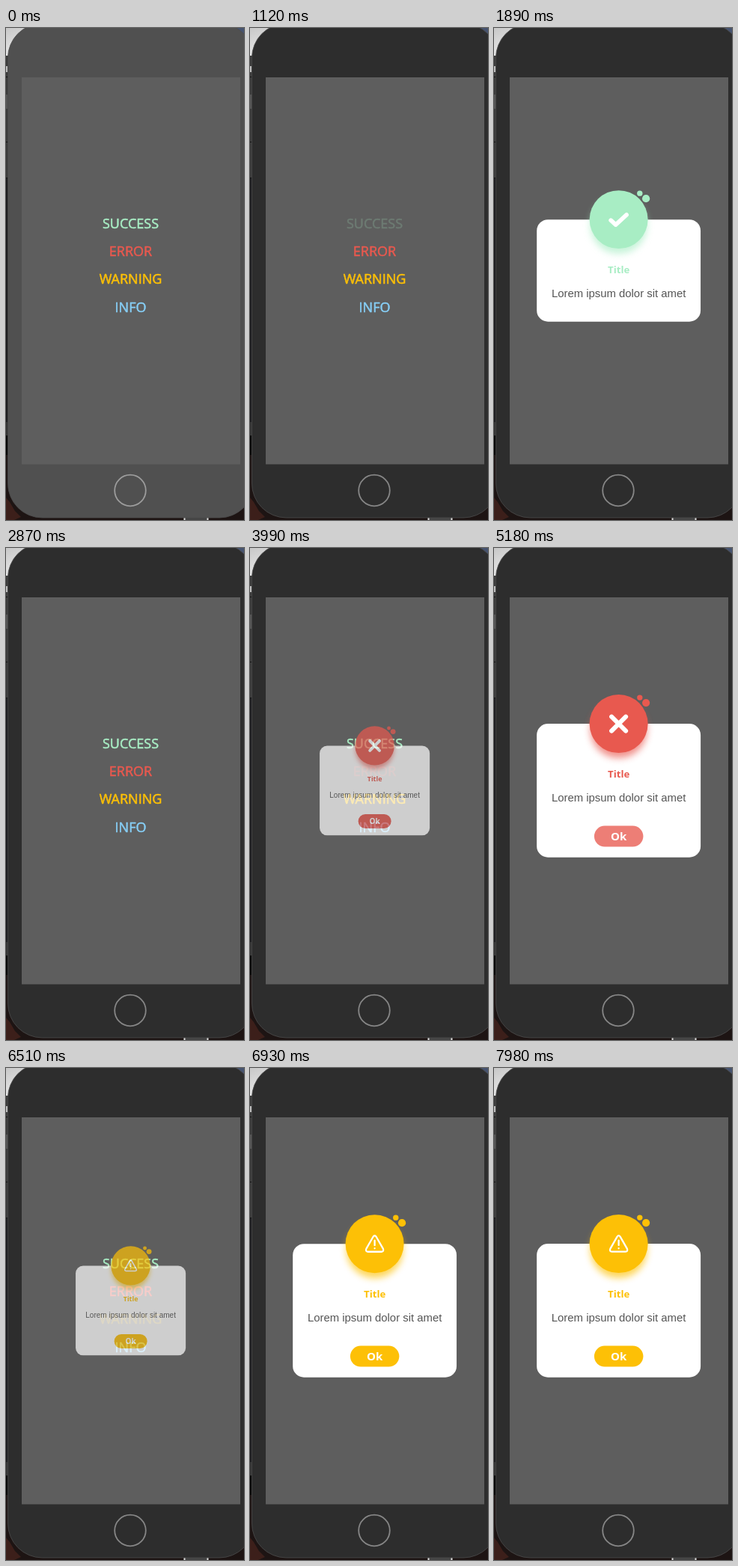
Animation of 318 by 658 pixels, one loop 8 s. Source, as an HTML page:

```html
<!DOCTYPE html>
<html lang="en">
<head>
<meta charset="utf-8">
<title>Popup demo</title>
<style>
  html, body { margin: 0; width: 100%; height: 100%; overflow: hidden; background: #222; }
  svg { display: block; width: 318px; height: 658px; }
  text { text-anchor: middle; }
  .menu { font: 400 18px "Open Sans", sans-serif; stroke-width: .55; stroke-linejoin: round; }
  .title { font: 700 13.2px "Open Sans", sans-serif; }
  .body { font: 400 14.9px "Liberation Sans", Arial, sans-serif; fill: #555; }
  .ok { font: 700 15px "Open Sans", sans-serif; fill: #fff; }
  .icon { fill: none; stroke: #fff; stroke-linecap: round; stroke-linejoin: round; }
</style>
</head>
<body>
<svg viewBox="0 0 318 658">
  <defs>
    <linearGradient id="light" x1="0" y1="0" x2=".6" y2="1">
      <stop offset="0" stop-color="#c8c8c8"/>
      <stop offset="1" stop-color="#f0f0f0"/>
    </linearGradient>
    <filter id="blur" x="-40%" y="-40%" width="180%" height="180%">
      <feGaussianBlur stdDeviation="5"/>
    </filter>
  </defs>

  <!-- desktop behind the phone -->
  <rect width="318" height="658" fill="#1c1c1f"/>
  <rect width="60" height="37" fill="url(#light)"/>
  <rect y="37" width="4" height="163" fill="#3a3a3a"/>
  <rect y="51" width="2" height="8" fill="#bbb"/>
  <rect y="89" width="4" height="19" fill="#555"/>
  <path d="M0 65.5H4M0 152.5H4M0 200.5H4" stroke="#111"/>
  <rect y="527" width="6" height="18" fill="#333"/>
  <rect y="545" width="8" height="26" fill="#050505"/>
  <rect y="571" width="318" height="87" fill="#1d1413"/>
  <path d="M0 628l5 6 7 12 8 8-9 4H0z" fill="#3c1f1a"/>
  <rect x="290" width="28" height="20" fill="#46536f"/>
  <rect x="238" y="650" width="32" height="8" fill="#444"/>
  <path d="M238.5 650V658M269.5 650V658" stroke="#ddd" stroke-width="2"/>

  <rect id="phone" x="2.5" y="-6" width="328.5" height="661" rx="46" stroke="#4c4c4c" stroke-width=".8"/>
  <rect x="21" y="66" width="292" height="517.5" fill="#5e5e5e"/>
  <circle id="home" cx="166" cy="618.5" r="20.8" fill="none" stroke-width="1.8"/>
  <g id="menu"></g>
  <g id="popups"></g>
</svg>
<script>
const LOOP = 8000;
const $ = id => document.getElementById(id);
const clamp = v => Math.max(0, Math.min(1, v));
const ease = p => p < .5 ? 2 * p * p : 1 - 2 * (1 - p) * (1 - p);

const icons = {
  check: '<path class="icon" stroke-width="5.6" d="M-10.5 1L-4 7L10.5 -6.3"/>',
  cross: '<path class="icon" stroke-width="6" d="M-9.5 -9.5L9.5 9.5M9.5 -9.5L-9.5 9.5"/>',
  alert: '<path class="icon" stroke-width="2.3" d="M-2.2 -9.2Q0 -12.6 2.2 -9.2L11.2 6.5Q12.8 10.2 9 10.6H-9Q-12.8 10.2 -11.2 6.5Z' +
         'M0 -4.5V2M0 6V6.2"/>'
};

// times in ms: press/release of the menu entry, open/close of its popup, tap on Ok
const items = [
  { label: 'SUCCESS', color: '#a8edc4', y: 267.5, icon: 'check', h: 136.6,
    press: 540, release: 1330, open: 1350, close: 2090 },
  { label: 'ERROR', color: '#e8594f', y: 305, icon: 'cross', h: 178.6, button: true,
    press: 3300, release: 3920, open: 3867, close: 5450, tap: 5125 },
  { label: 'WARNING', color: '#fdc006', y: 342.2, icon: 'alert', h: 178.6, button: true,
    press: 5870, release: 6440, open: 6387, close: Infinity, tap: Infinity },
  { label: 'INFO', color: '#86cdf4', y: 379.5 }
];

function popup({ color, h, icon, button }) {
  const ok = `<rect class="pill" x="-32.7" y="136.5" width="65.5" height="28" rx="14" fill="${color}"/>
    <text class="ok" y="156">Ok</text>`;
  return `<g class="popup"><g transform="translate(0 ${-h / 2})">
    <rect x="-109.5" width="219" height="${h}" rx="15" fill="#fff"/>
    <circle cy="8" r="38" fill="${color}" opacity=".65" filter="url(#blur)"/>
    <circle r="39" fill="${color}"/>
    <circle cx="28.2" cy="-35" r="3.7" fill="${color}"/>
    <circle cx="36.5" cy="-28" r="5.1" fill="${color}"/>
    ${icons[icon]}
    <text class="title" y="71.5" fill="${color}">Title</text>
    <text class="body" y="103.5">Lorem ipsum dolor sit amet</text>
    ${button ? ok : ''}
  </g></g>`;
}

$('menu').innerHTML = items.map(i =>
  `<text class="menu" x="166.5" y="${i.y}" fill="${i.color}" stroke="${i.color}">${i.label}</text>`).join('');
const dialogs = items.filter(i => i.icon);
$('popups').innerHTML = dialogs.map(popup).join('');
items.forEach((i, n) => i.text = $('menu').children[n]);
dialogs.forEach((d, n) => {
  d.node = $('popups').children[n];
  d.pill = d.node.querySelector('.pill');
});

// damped spring from 0 to 1, about 3.7 % overshoot
function spring(ms) {
  if (ms <= 0) return 0;
  const s = ms / 1000, w = 10.45;
  return 1 - Math.exp(-11 * s) * (Math.cos(w * s) + 11 / w * Math.sin(w * s));
}

// opacity of a touched control
function touch(t, press, release) {
  const down = ease(clamp((t - press) / 150));
  const up = ease(clamp((t - release) / 250));
  return 1 - .8 * down * (1 - up);
}

function draw(t) {
  const dim = t >= 980;
  $('phone').setAttribute('fill', dim ? '#2d2d2d' : '#505050');
  $('home').setAttribute('stroke', dim ? '#868686' : '#9c9c9c');

  for (const i of items)
    if (i.press) i.text.setAttribute('opacity', touch(t, i.press, i.release));

  for (const d of dialogs) {
    const s = Math.max(0, spring(t - d.open) - spring(t - d.close));
    const gone = s < .005 || t > d.close + 230;
    d.node.setAttribute('visibility', gone ? 'hidden' : 'visible');
    d.node.setAttribute('opacity', Math.min(1, s * 1.04));
    d.node.setAttribute('transform', `translate(166.6 324.4) scale(${Math.max(s, .001)})`);
    if (d.pill) d.pill.setAttribute('opacity', touch(t, d.tap, d.tap + 250));
  }
}

function tick() {
  draw(performance.now() % LOOP);
  requestAnimationFrame(tick);
}
tick();
</script>
</body>
</html>
```
